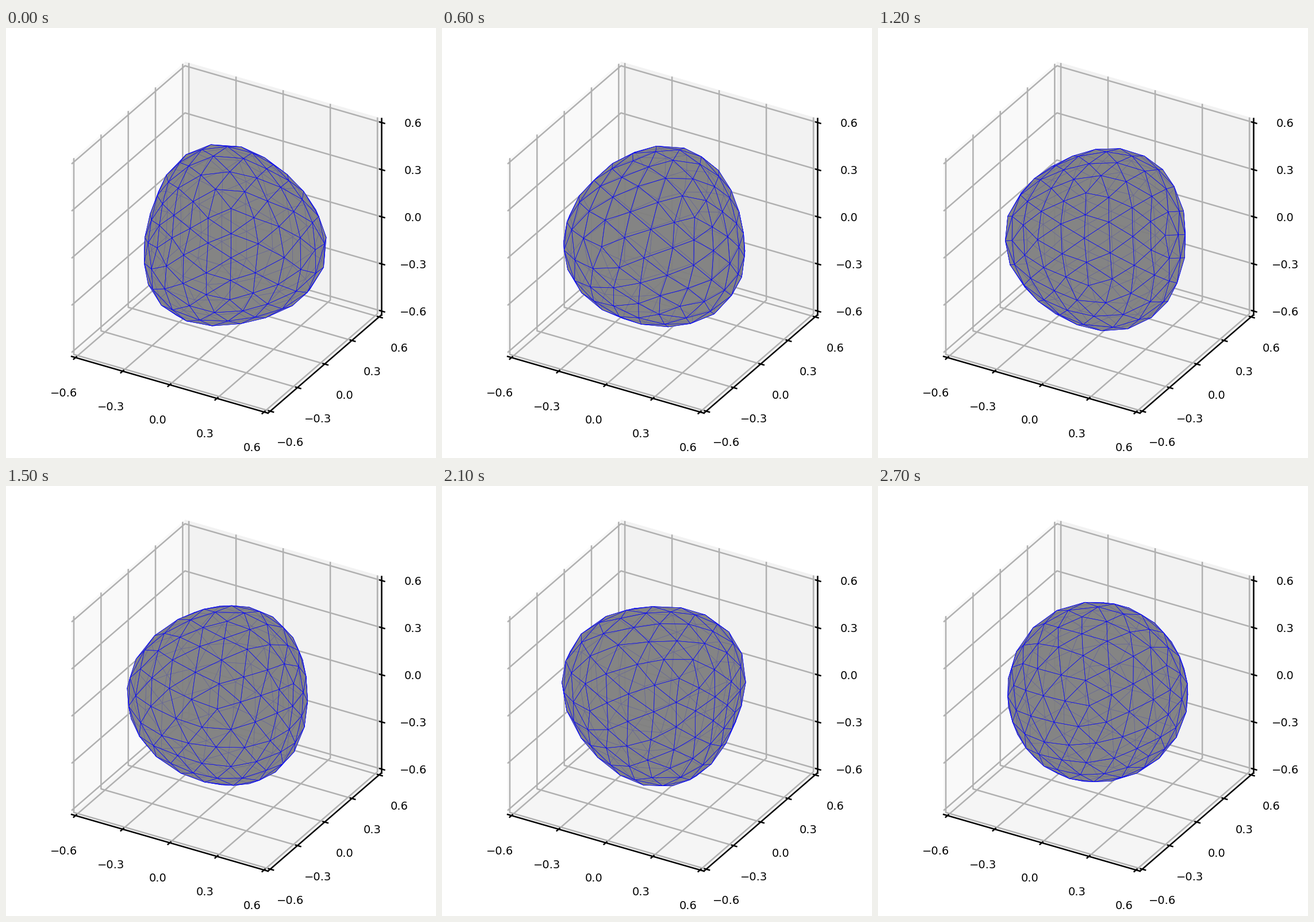
A matplotlib script that plays this animation: 748x748 px, repeating every 3000 ms.

```python
from itertools import combinations

import matplotlib.pyplot as plt
import numpy as np
from matplotlib.animation import FuncAnimation
from matplotlib.collections import LineCollection, PolyCollection

SIZE, DPI = 748, 100
INTERVAL = 300
CENTER = np.array([383.5, 364.4])
SCALE = 315.6                       # pixels per data unit
EDGE = 0.625                        # half side of the box, margin included
TICKS = (-0.6, -0.3, 0.0, 0.3, 0.6)
LINE = 1.8
RADIUS = 158

# Main corner heading in degrees, three-lobed bulge and drift in pixels
POSES = (
    (-15, 10, 9), (100, 3, 4), (194, 7, 10), (200, 4, 10), (-63, 7, 3),
    (180, 6, 10), (-55, 1, 4), (157, 8, 14), (104, 14, 0), (111, 1, 6),
)


def project(points):
    """Orthographic view, elevation 30 and azimuth -60 degrees, in pixels."""
    c = np.sqrt(3) / 2
    axes = np.array([[c, 0.25], [0.5, -c / 2], [0, -c]])
    return CENTER + SCALE * np.asarray(points, float) @ axes


def icosphere(levels):
    """Triangles of a subdivided icosahedron on the unit sphere."""
    g = (1 + 5 ** 0.5) / 2
    corners = [np.roll((0, a, b), k)
               for k in range(3) for a in (-1, 1) for b in (-g, g)]
    tris = np.array([t for t in combinations(corners, 3)
                     if all(np.linalg.norm(p - q) < 2.1
                            for p, q in combinations(t, 2))])
    for _ in range(levels):
        a, b, c = tris[:, 0], tris[:, 1], tris[:, 2]
        ab, bc, ca = (a + b) / 2, (b + c) / 2, (c + a) / 2
        parts = ((a, ab, ca), (b, bc, ab), (c, ca, bc), (ab, bc, ca))
        tris = np.concatenate([np.stack(p, axis=1) for p in parts])
        tris /= np.linalg.norm(tris, axis=2, keepdims=True)
    return tris


def pose(index):
    """Projected triangles of one pose, ordered from back to front."""
    heading, bulge, drift = POSES[index]
    rng = np.random.default_rng(40 + index)
    turn, _ = np.linalg.qr(rng.normal(size=(3, 3)))
    x, y, depth = np.moveaxis(SPHERE @ turn, 2, 0)
    angle = np.arctan2(y, x) - np.radians(heading)
    radius = RADIUS + bulge * np.cos(3 * angle) + drift * np.cos(angle)
    flat = CENTER + np.stack((x * radius, -y * radius), axis=2)
    return flat[np.argsort(depth.mean(axis=1))]


def draw_box(ax):
    e = EDGE
    panes = [
        ([(-e, -e, -e), (-e, e, -e), (-e, e, e), (-e, -e, e)], 0.975),
        ([(-e, e, -e), (e, e, -e), (e, e, e), (-e, e, e)], 0.95),
        ([(-e, -e, -e), (e, -e, -e), (e, e, -e), (-e, e, -e)], 0.9625),
    ]
    for corners, shade in panes:
        ax.add_collection(PolyCollection(
            [project(corners)], facecolor=str(shade), edgecolor=str(shade),
            linewidth=1, zorder=1))

    grid = []
    for t in TICKS:
        grid += [
            project([(t, -e, -e), (t, e, -e), (t, e, e)]),
            project([(e, t, -e), (-e, t, -e), (-e, t, e)]),
            project([(-e, -e, t), (-e, e, t), (e, e, t)]),
        ]
    ax.add_collection(LineCollection(grid, colors="#b0b0b0",
                                     linewidths=LINE, zorder=2))


def draw_axes(ax):
    outward = np.array([(0, -1, -1), (1, 0, -1), (1, 1, 0)])
    strokes = []
    for unit, out in zip(np.eye(3), outward):
        base = EDGE * out
        strokes.append(project([base - EDGE * unit, base + EDGE * unit]))
        # ticks follow the first outward direction only
        tick = np.where(np.arange(3) == np.flatnonzero(out)[0], out, 0)
        for t in TICKS:
            at = base + t * unit
            strokes.append(project([at - 0.01 * tick, at + 0.02 * tick]))
            ax.text(*project(at + 0.1285 * out),
                    f"{t:.1f}".replace("-", "\u2212"), ha="center", va="top",
                    fontsize=14, family="DejaVu Sans", zorder=3)
    ax.add_collection(LineCollection(strokes, colors="black", linewidths=LINE,
                                     capstyle="projecting", zorder=3))


SPHERE = icosphere(2)

fig = plt.figure(figsize=(SIZE / DPI, SIZE / DPI), dpi=DPI, facecolor="white")
ax = fig.add_axes([0, 0, 1, 1])
ax.set(xlim=(0, SIZE), ylim=(SIZE, 0))
ax.axis("off")
draw_box(ax)
draw_axes(ax)
mesh = PolyCollection(pose(0), facecolors=(0.5, 0.5, 0.5, 0.8),
                      edgecolors="blue", linewidths=0.45, zorder=4)
ax.add_collection(mesh)


def update(frame):
    mesh.set_verts(pose(frame))
    return (mesh,)


anim = FuncAnimation(fig, update, frames=len(POSES), interval=INTERVAL,
                     repeat=True, repeat_delay=0)
plt.show()
```
